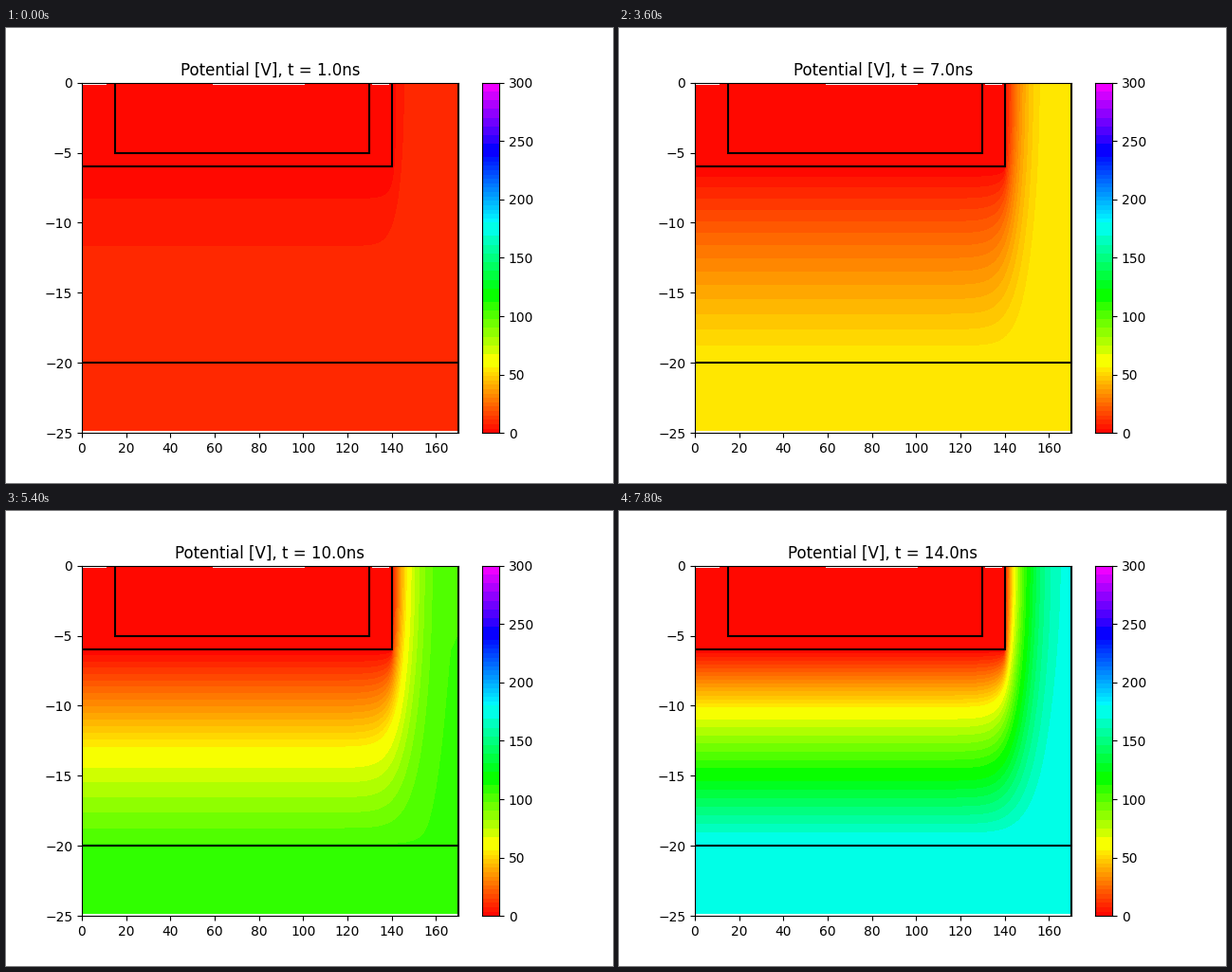
A matplotlib script for the animation above (8 s loop, 640 px wide and 480 px high).

```python
import colorsys

import matplotlib.pyplot as plt
import numpy as np
from matplotlib.animation import FuncAnimation
from matplotlib.patches import Rectangle

W, H, DPI = 640, 480, 100
INTERVAL, FRAMES, HOLD = 200, 40, 3

# Bulk bias in volts after 1, 2, 3 ... ns, and half the space-charge curvature.
BIAS = [9.6, 11, 22.72, 31.3, 39.5, 48, 56.1, 72.4, 88.7, 105.6, 121.7, 148, 173, 179.5]
CURVE = [0.091, 0.0704] + [0.076] * 12

# Device geometry in micrometres.
X_MAX, X_START, X_EDGE = 170, 100, 140
WELL, JUNCTION, DEPTH, BOTTOM = 5, 6, 20, 24.85
STEP = 0.5

# Fine colour bands of 3.75 V; coarser ones where two or three merge.
FINE = 3.75
LEVELS = FINE * np.concatenate([
    np.arange(0, 16), np.arange(18, 31, 2), np.arange(33, 46, 2),
    np.arange(48, 64), np.arange(66, 81, 2)])
MIDS = (LEVELS[:-1] + LEVELS[1:]) / 2
COLORS = [colorsys.hsv_to_rgb(v / 360, 1, 1) for v in MIDS]

xs = np.arange(X_START, X_MAX + STEP, STEP)
ds = np.arange(0, DEPTH + STEP, STEP)
gx, gd = np.meshgrid(xs, ds)
electrode = (gx <= X_EDGE) & (gd <= JUNCTION)
free = ~electrode & (gd < DEPTH)
parity = np.add.outer(np.arange(len(ds)), np.arange(len(xs))) % 2
halves = [free & (parity == p) for p in (0, 1)]


def solve(bias, curve, sweeps=250, omega=1.9):
    """Depletion potential: Poisson equation limited by the neutral bulk."""
    drop = 0.04 * (DEPTH - gd) * (1 + np.minimum(X_MAX - gx, 40) / 40)
    cap = bias - drop
    v = np.where(electrode, 0, np.where(free, cap * gd / DEPTH, bias))
    source = 2 * curve * STEP ** 2
    for _ in range(sweeps):
        for half in halves:
            p = np.pad(v, 1, mode="reflect")
            mean = (p[:-2, 1:-1] + p[2:, 1:-1] + p[1:-1, :-2] + p[1:-1, 2:] + source) / 4
            v = np.where(half, np.minimum(v + omega * (mean - v), cap), v)
    v = np.vstack([v, np.full(len(xs), bias)])
    v = np.column_stack([v[:, 0], v])
    return np.maximum(v, 0.01)


fields = [solve(b, c) for b, c in zip(BIAS, CURVE)]
plot_x = np.append(0, xs)
plot_y = -np.append(ds, BOTTOM)

fig = plt.figure(figsize=(W / DPI, H / DPI), dpi=DPI, facecolor="white")
ax = fig.add_axes([0.125, 0.11, 0.62, 0.77])
ax.set_xlim(0, X_MAX)
ax.set_ylim(-25, 0)
ax.set_xticks(range(0, 161, 20))
ax.set_yticks(range(-25, 1, 5))
title = ax.set_title("")

# Gaps in the mesh along the top surface.
for left, right in [(0, 11), (59, 100.8), (131, 139)]:
    ax.add_patch(Rectangle((left, -0.15), right - left, 0.15, color="white", lw=0, zorder=1.5))

outlines = [
    ([15, 15, 130, 130], [0, -WELL, -WELL, 0]),
    ([0, X_EDGE, X_EDGE], [-JUNCTION, -JUNCTION, 0]),
    ([0, X_MAX], [-DEPTH, -DEPTH]),
    ([X_MAX, X_MAX], [0, -25]),
]
for px, py in outlines:
    ax.plot(px, py, color="black", lw=1.5, solid_joinstyle="miter")

bar = fig.add_axes([501.6 / W, 0.11, 18.48 / W, 0.77])
for low, high, color in zip(LEVELS, LEVELS[1:], COLORS):
    bar.axhspan(low, high, color=color, lw=0, antialiased=False)
bar.set_xlim(0, 1)
bar.set_ylim(0, 300)
bar.set_xticks([])
bar.set_yticks(range(0, 301, 50))
bar.yaxis.tick_right()

shown = []


def draw(frame):
    step = frame // HOLD
    while shown:
        shown.pop().remove()
    shown.append(ax.contourf(plot_x, plot_y, fields[step], levels=LEVELS,
                             colors=COLORS, zorder=1))
    title.set_text(f"Potential [V], t = {step + 1:.1f}ns")
    return []


anim = FuncAnimation(fig, draw, frames=FRAMES, init_func=lambda: draw(0),
                     interval=INTERVAL, repeat=True, repeat_delay=0)
plt.show()
```
